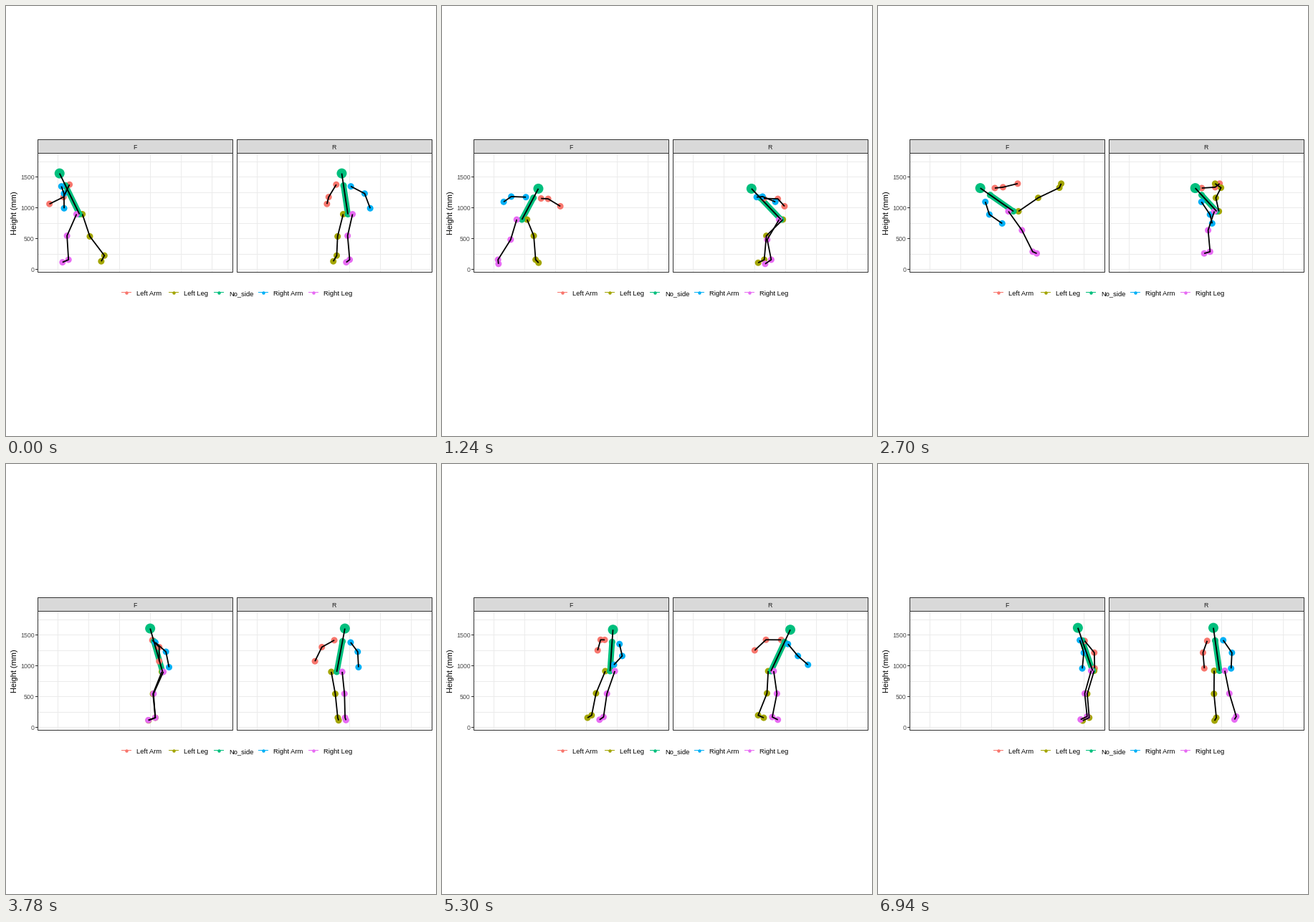
Write a matplotlib script that moves like this. It is 600 px wide and 600 px high and loops after 6.96 s.

```python
import numpy as np
import matplotlib.pyplot as plt
from matplotlib.animation import FuncAnimation
from matplotlib.patches import Rectangle

SIZE, DPI, STEP, FRAMES = 600, 100, 20, 348
PX = 72 / DPI
plt.rcParams["font.family"] = "Liberation Sans"

COLORS = {"Left Arm": "#F8766D", "Left Leg": "#A3A500", "No_side": "#00BF7D",
          "Right Arm": "#00B0F6", "Right Leg": "#E76BF3"}

# Body sizes in pixels.
TRUNK, HEAD, SHOULDER, HIP = 45, 0.42, 11.7, 7.7
ARM, UPPER_ARM, LEG, THIGH, FLOOR = 41, 22, 66, 33.6, 353.5

# Key poses: time, pelvis (x in F, x in R, y), yaw, then the swing of each part as
# (clockwise degrees from upright, sideways reach):
# trunk, left arm, right arm, left leg, right leg.
POSES = [
    (0, (102, 476.5, 290), 212, (-26, -6), (226, -13), (173, 27), (152, -9), (190, -4)),
    (1240, (111, 472.5, 297.5), 290, (28, -29), (112, 29), (258, 26), (168, -26), (205, -11)),
    (1980, (144.5, 450.5, 277.5), 425, (115, 28), (278, -15), (81, -19), (190, -4), (321, -8)),
    (2700, (188.5, 472, 286), 294, (305, -21), (439, 25), (142, 15), (420, 3), (509, -6)),
    (3780, (218, 461, 289.5), 172, (344, 8), (522, -27), (151, 11), (548, 9), (550, 4)),
    (5300, (234, 458.5, 288.5), 120, (364, 19), (574, -37), (195, 28), (555, -14), (556, -2)),
    (6940, (299, 476, 288), 196, (341, -6), (520, -4), (175, 11), (546, 3), (545, 16)),
]


def glide(kt, kp, t):
    """Monotone cubic through the key values, sampled at times t."""
    h = np.diff(kt)[:, None]
    d = np.diff(kp, axis=0) / h
    m = np.zeros_like(kp)
    prod, total = d[:-1] * d[1:], d[:-1] + d[1:]
    m[1:-1] = np.where(prod > 0, 2 * prod / np.where(total == 0, 1, total), 0)
    m[-1] = d[-1]
    i = np.clip(np.searchsorted(kt, t, side="right") - 1, 0, len(h) - 1)
    u = ((t - kt[i]) / h[i, 0])[:, None]
    return (kp[i] * (1 + 2 * u) * (1 - u) ** 2 + m[i] * h[i] * u * (1 - u) ** 2
            + kp[i + 1] * u * u * (3 - 2 * u) + m[i + 1] * h[i] * u * u * (u - 1))


def vec(x, r, y):
    return np.stack(np.broadcast_arrays(x, r, y), axis=-1)


def unit(v):
    return v / np.maximum(np.linalg.norm(v, axis=-1, keepdims=True), 1e-9)


def across_only(v, axis):
    """Direction of v once its share along axis is taken out."""
    axis = unit(axis)
    return unit(v - (v * axis).sum(-1, keepdims=True) * axis)


def swing(angle, side, reach):
    return vec(reach * np.sin(angle), side, -reach * np.cos(angle))


def span(length, side):
    return np.sqrt(np.maximum(length ** 2 - side ** 2, 0))


def bent(start, end, bone, toward):
    """Middle joint of a limb with two equal bones."""
    limb = end - start
    half = np.linalg.norm(limb, axis=-1) / 2
    return (start + end) / 2 + across_only(toward, limb) * span(bone, half)[:, None]


def arm(shoulder, angle, side, elbow_way):
    wrist = shoulder + swing(angle, side, span(ARM, side))
    return np.stack([shoulder, bent(shoulder, wrist, UPPER_ARM, elbow_way), wrist], 1)


def leg(hip, angle, side, ahead):
    down = -np.cos(angle)
    room = np.where(down > 0.2, (FLOOR - hip[:, 2]) / np.maximum(down, 0.2), LEG)
    ankle = hip + swing(angle, side, np.minimum(span(LEG, side), room))
    front = vec(-ahead[:, 0] * np.cos(angle), ahead[:, 1], -ahead[:, 0] * np.sin(angle))
    toe = ankle + 9 * front + swing(angle, 0, 5)
    return np.stack([hip, bent(hip, ankle, THIGH, front), ankle, toe], 1)


def build(t):
    flat = np.array([np.hstack(p) for p in POSES], float)
    tracks = glide(flat[:, 0], flat[:, 1:], t)
    base, yaw = tracks[:, :3], np.radians(tracks[:, 3])
    angles, sides = np.radians(tracks[:, 4::2]).T, tracks[:, 5::2].T

    # Two opposite steps once the turn is over.
    walk_start, walk_time = POSES[4][0], POSES[-1][0] - POSES[4][0]
    phase = np.clip((t - walk_start) / walk_time, 0, 1)
    stride = np.radians(18) * np.sin(2 * np.pi * phase)
    angles[3] += stride
    angles[4] -= stride

    ahead = vec(np.cos(yaw), np.sin(yaw), 0)
    left = vec(-np.sin(yaw), np.cos(yaw), 0)
    trunk = swing(angles[0], sides[0], span(TRUNK, sides[0]))
    neck = base + trunk
    girdle = across_only(left, trunk) * SHOULDER
    return {
        "Left Arm": arm(neck + girdle, angles[1], sides[1], left - ahead),
        "Left Leg": leg(base + left * HIP, angles[3], sides[3], ahead),
        "No_side": np.stack([neck + HEAD * trunk, neck, base], 1),
        "Right Arm": arm(neck - girdle, angles[2], sides[2], -left - ahead),
        "Right Leg": leg(base - left * HIP, angles[4], sides[4], ahead),
    }


motion = {part: joints + 0.5
          for part, joints in build(np.arange(FRAMES) * float(STEP)).items()}

fig = plt.figure(figsize=(SIZE / DPI, SIZE / DPI), dpi=DPI, facecolor="white")
ax = fig.add_axes([0, 0, 1, 1])
ax.set(xlim=(0, SIZE), ylim=(SIZE, 0))
ax.axis("off")


def line(xs, ys, color, width=1, z=1):
    return ax.plot(xs, ys, color=color, lw=width * PX, zorder=z, snap=False,
                   solid_capstyle="butt")[0]


def box(x0, y0, x1, y1, fill):
    ax.add_patch(Rectangle((x0, y0), x1 - x0, y1 - y0, fc=fill, ec="#333333",
                           lw=PX, zorder=8, snap=False))


def label(x, y, text, size, color="black", **kw):
    ax.text(x, y, text, fontsize=size * PX, color=color, zorder=9,
            **{"ha": "center", "va": "baseline", **kw})


class Panel:
    def __init__(self, left, title, axis):
        right = left + 272
        for k in range(6):
            x = left + 28 + 43 * k
            line([x, x], [206, 371], "#EBEBEB")
        for k in range(8):
            y = (367.5 - 21.5 * k) // 1 + 0.5
            line([left, right], [y, y], "#EBEBEB")
        box(left, 205.5, right, 371.5, "none")
        box(left, 186.5, right, 205.5, "#D9D9D9")
        label(left + 135, 200, title, 8.8, "#1A1A1A")

        self.axis = axis
        self.trunk = line([], [], COLORS["No_side"], 8, 3)
        sizes, fills = [], []
        for part, joints in motion.items():
            n = joints.shape[1]
            sizes += [9] * n
            fills += [COLORS[part]] * n
            if part == "No_side":
                sizes[-n] = 14
        self.dots = ax.scatter(np.zeros(len(sizes)), np.zeros(len(sizes)),
                               s=(np.array(sizes) * PX) ** 2, c=fills,
                               linewidths=0, zorder=4, snap=False)
        self.bones = {part: line([], [], "black", 1.8, 5) for part in motion}

    def draw(self, i):
        pts = {part: joints[i][:, [self.axis, 2]] for part, joints in motion.items()}
        self.dots.set_offsets(np.concatenate(list(pts.values())))
        for part, bone in self.bones.items():
            bone.set_data(*pts[part].T)
        self.trunk.set_data(*pts["No_side"][1:].T)
        return [self.trunk, self.dots, *self.bones.values()]


panels = [Panel(44.5, "F", 0), Panel(322.5, "R", 1)]

for k in range(4):
    y = (367.5 - 43 * k) // 1 + 0.5
    line([41, 44], [y, y], "#333333")
    label(39.5, y + 3.6, str(500 * k), 8.8, "#4D4D4D", ha="right")
label(12, 288.5, "Height (mm)", 11, rotation=90, va="center")

for x, (name, color) in zip((168, 234, 297, 359, 429), COLORS.items()):
    line([x - 7, x + 7], [399.5, 399.5], color)
    ax.scatter([x], [399.5], s=(4.5 * PX) ** 2, c=color, linewidths=0, zorder=4)
    label(x + 14, 404, name, 9.4, ha="left")


def update(i):
    return [artist for panel in panels for artist in panel.draw(i)]


anim = FuncAnimation(fig, update, frames=FRAMES, interval=STEP, repeat=True,
                     repeat_delay=0, init_func=lambda: update(0), blit=False)
plt.show()
```
